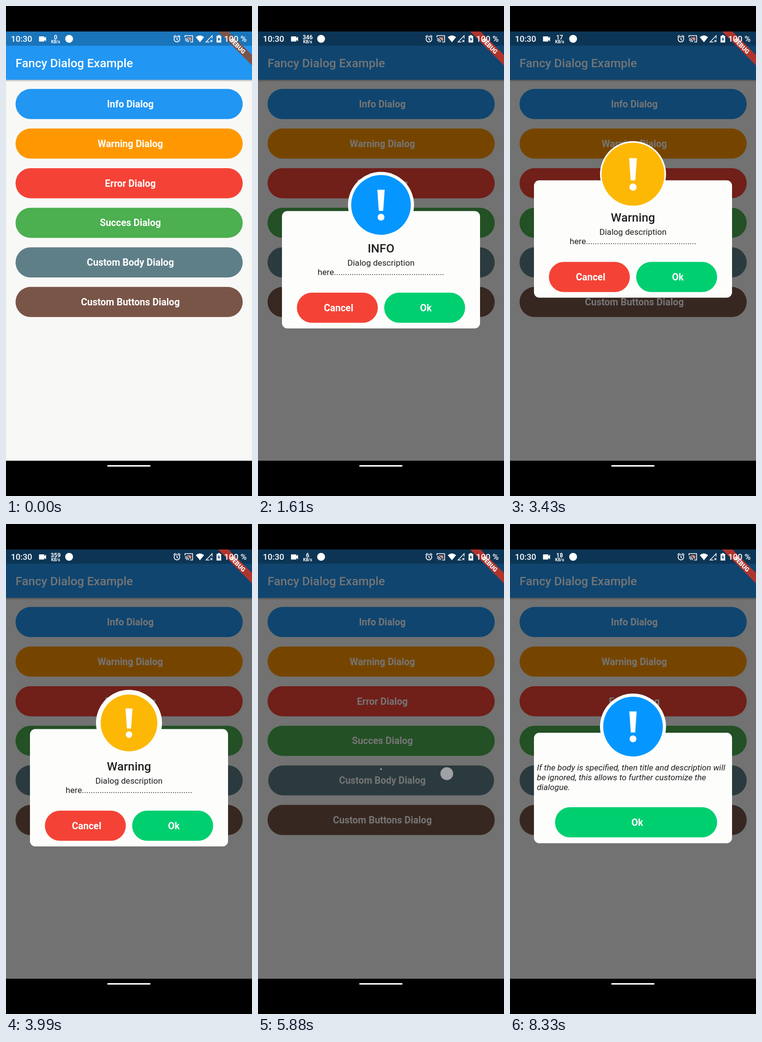
Write an HTML page that moves like this. It is 503x1000 px and loops after 8.4 s.

```html
<!DOCTYPE html>
<html lang="en">
<head>
<meta charset="utf-8">
<title>Dialog demo</title>
<style>
  html, body { margin: 0; width: 100%; height: 100%; overflow: hidden; background: #000; }
  svg { display: block; width: 503px; height: 1000px; font-family: Roboto, sans-serif; }
  .label { font-size: 19.57px; font-weight: 700; fill: #fff; text-anchor: middle; }
  .title { font-size: 24.46px; font-weight: 500; }
  .desc { font-size: 17.12px; }
  .mid { text-anchor: middle; }
</style>
</head>
<body>
<svg id="stage" viewBox="0 0 503 1000">
  <defs>
    <linearGradient id="shade" x2="0" y2="1">
      <stop stop-opacity=".3"/><stop offset="1" stop-opacity="0"/>
    </linearGradient>
  </defs>
  <rect y="52" width="503" height="876" fill="#f8f9f7"/>
  <rect y="150" width="503" height="5" fill="url(#shade)"/>
  <rect y="81" width="503" height="69.5" fill="#2196f3"/>
  <rect y="52" width="503" height="29" fill="#1a74ba"/>
  <text class="title" x="19.5" y="125" fill="#fff">Fancy Dialog Example</text>
  <g id="menu"></g>
  <rect id="dim" y="52" width="503" height="876" opacity="0"/>
  <g id="dialogs"></g>
  <g transform="translate(503 52) rotate(45)">
    <rect id="banner" x="-49" y="34" width="98" height="15"/>
    <text class="mid" y="46" font-size="12.4" font-weight="900" fill="#fff">DEBUG</text>
  </g>
  <rect width="503" height="52"/>
  <rect y="928" width="503" height="72"/>
  <rect x="207" y="937" width="88.500" height="3" rx="1.500" fill="#fff"/>

  <g fill="#fff" font-weight="500">
    <text x="10" y="73" font-size="17.2">10:30</text>
    <path d="M68.500 62h9a1 1 0 0 1 1 1v2.500l3.500-3v9.500l-3.500-3v2.500a1 1 0 0 1-1 1h-9a1 1 0 0 1-1-1v-8.500a1 1 0 0 1 1-1z"/>
    <text id="rate" class="mid" x="101.500" y="67.500" font-size="12" font-weight="700"></text>
    <text class="mid" x="101.500" y="76" font-size="8.500" font-weight="700">KB/s</text>
    <circle cx="129" cy="67" r="8"/>
    <g fill="none" stroke="#fff" stroke-width="1.600">
      <circle cx="349.500" cy="67.500" r="5.800"/>
      <path d="M349.500 64v4l2.500 2M342.500 63l4-3.500M356.500 63l-4-3.500"/>
      <path d="M366 64v-3.500h15.500v13h-5M366 66.500a7 7 0 0 1 7 7M366 69.500a4 4 0 0 1 4 4"/>
      <path d="M416 73.500h-7l12.500-13v6M418 69.500l4 4m0-4l-4 4" stroke-width="1.400"/>
    </g>
    <path d="M369.500 64h9v7h-3a9 9 0 0 0-6-6z" fill="#e58a72"/>
    <path d="M388 63.500q8.500-7 17 0l-8.500 10.500z"/>
    <path d="M433 59.500h4.500v1.500h2.500v13.500h-9.500v-13.500h2.500z"/>
    <path d="M436 63l-3.500 5.500h2.200v4l3.500-5.500h-2.200z" fill="#1a5688"/>
    <text x="446" y="73" font-size="17.2">100 %</text>
  </g>
  <circle id="dot" r="13" fill="#ece6eb" fill-opacity=".6" stroke="#8a8a8a" stroke-opacity=".45"/>
</svg>
<script>
const LOOP = 8400, CX = 251.5;
const $ = id => document.getElementById(id);
const clamp = v => Math.max(0, Math.min(1, v));
const easeOut = v => 1 - (1 - v) ** 3;
const easeOutBack = v => 1 + 2.7 * (v - 1) ** 3 + 1.7 * (v - 1) ** 2;
const elasticIn = v => v <= 0 ? 0 :
  -(2 ** (10 * (v - 1))) * Math.sin((v - 1.1) * Math.PI * 5);

function add(parent, tag, attrs, text) {
  const el = document.createElementNS("http://www.w3.org/2000/svg", tag);
  for (const key in attrs) el.setAttribute(key, attrs[key]);
  if (text) el.textContent = text;
  parent.append(el);
  return el;
}

// Pill button that scales about its own centre.
function button(parent, x, y, w, fill, label) {
  const h = 61.5, cx = x + w / 2, cy = y + h / 2;
  const g = add(parent, "g", {});
  add(g, "rect", { x: -w / 2, y: -h / 2, width: w, height: h, rx: h / 2, fill });
  add(g, "text", { class: "label", x: 2.5, y: 7 }, label);
  const scale = s => g.setAttribute("transform", `translate(${cx} ${cy}) scale(${s})`);
  scale(1);
  return scale;
}

function dialog({ top, height, color }) {
  const g = add($("dialogs"), "g", { fill: "#1f1f1f" });
  add(g, "rect", { x: 49, y: top, width: 405, height, rx: 11, fill: "#fdfefc" });
  add(g, "circle", { cx: CX, cy: top - 12.5, r: 67.5, fill: "#fdfefc" });
  const icon = add(g, "g", {});
  add(icon, "circle", { r: 61, fill: color });
  add(icon, "path", { d: "M-7.5-31H7.500L4.500 12H-4.500Z", fill: "#fff" });
  add(icon, "circle", { cy: 25, r: 7, fill: "#fff" });
  return { g, icon };
}

function messageDialog(color, title) {
  const d = dialog({ top: 418.5, height: 239.5, color });
  add(d.g, "text", { class: "title mid", x: CX, y: 503 }, title);
  add(d.g, "text", { class: "desc mid", x: CX, y: 530 }, "Dialog description");
  add(d.g, "text", { class: "desc mid", x: CX, y: 549 }, "here" + ".".repeat(50));
  button(d.g, 79.5, 585, 165.5, "#f44336", "Cancel");
  d.ok = button(d.g, 258, 585, 165.5, "#00cf70", "Ok");
  return d;
}

function bodyDialog() {
  const d = dialog({ top: 426, height: 225.5, color: "#0597ff" });
  ["If the body is specified, then title and description will",
   "be ignored, this allows to further customize the", "dialogue."].forEach((line, i) =>
    add(d.g, "text", { class: "desc", x: 55, y: 502.5 + i * 20, "font-style": "italic" }, line));
  d.ok = button(d.g, 92, 578, 331.5, "#00cf70", "Ok");
  return d;
}

const menu = [["Info", "#2196f3"], ["Warning", "#ff9800"], ["Error", "#f44336"],
  ["Succes", "#4caf50"], ["Custom Body", "#5f7f88"], ["Custom Buttons", "#795548"]]
  .map(([name, fill], i) => button($("menu"), 19.5, 169.3 + i * 80.8, 464.5, fill, name + " Dialog"));

// Each visit: tap a menu entry, watch the dialog, optionally tap Ok.
const visits = [
  { ...messageDialog("#0597ff", "INFO"), item: 0, tap: { down: 190, up: 400, x: 373, y: 195 },
    close: { down: 2100, up: 2300, x: 343, y: 616 }, from: 1, pulses: 1, cy: 406 },
  { ...messageDialog("#fdb806", "Warning"), item: 1, tap: { down: 2860, up: 3070, x: 373, y: 275.5 },
    close: { down: 4550, up: 4750, x: 343, y: 616 }, from: -1, pulses: 1, cy: 406 },
  { ...bodyDialog(), item: 4, tap: { down: 5540, up: 5740, x: 386, y: 509.5 },
    close: { down: Infinity, up: Infinity }, from: 0, pulses: 3, cy: 413.5 },
];
const rates = [[0, 0], [900, 346], [2400, 17], [3700, 359], [5000, 6], [6600, 326], [7600, 18]];

function pressScale(t, { down, up }) {
  const back = up + 60;
  const v = t < back ? clamp((t - down) / 200) : 1 - clamp((t - back) / 200);
  return 1 - 0.1 * elasticIn(v);
}

function iconScale(age, pulses) {
  const n = (age - 510) / 540;
  if (n < 0) return Math.max(0, easeOutBack(clamp(age / 510)));
  return n > pulses ? 1 : 1 - 0.05 * Math.sin(Math.PI * n) ** 2;
}

function draw(t) {
  let dim = 0, touch = null;
  for (const v of visits) {
    const { tap, close } = v;
    const fade = 1 - clamp((t - close.up) / 150);
    const age = t - tap.up - 140;
    dim += clamp((t - tap.up) / 130) * fade;
    for (const p of [tap, close]) if (t >= p.down && t < p.up + 160) touch = p;

    menu[v.item](pressScale(t, tap));
    v.ok(pressScale(t, close));
    const shown = age > 0 && fade > 0;
    v.g.setAttribute("visibility", shown ? "visible" : "hidden");
    if (!shown) continue;
    const p = easeOut(clamp(age / 400));
    v.g.setAttribute("opacity", fade);
    v.g.setAttribute("transform", v.from
      ? `translate(0 ${(1 - p) * 700 * v.from})`
      : `translate(${CX} 500) scale(${p}) translate(${-CX} -500)`);
    v.icon.setAttribute("transform", `translate(${CX} ${v.cy}) scale(${iconScale(age, v.pulses)})`);
  }
  $("dim").setAttribute("opacity", dim * 0.54);
  const mix = (a, b) => a + (b - a) * dim;
  $("banner").setAttribute("fill", `rgb(${mix(122, 176)},${mix(84, 52)},${mix(74, 46)})`);
  $("rate").textContent = rates.filter(r => r[0] <= t).pop()[1];
  $("dot").setAttribute("visibility", touch ? "visible" : "hidden");
  if (touch) $("dot").setAttribute("transform", `translate(${touch.x} ${touch.y})`);
}

const start = performance.now();
function tick() {
  draw((performance.now() - start) % LOOP);
  requestAnimationFrame(tick);
}
tick();
</script>
</body>
</html>
```
